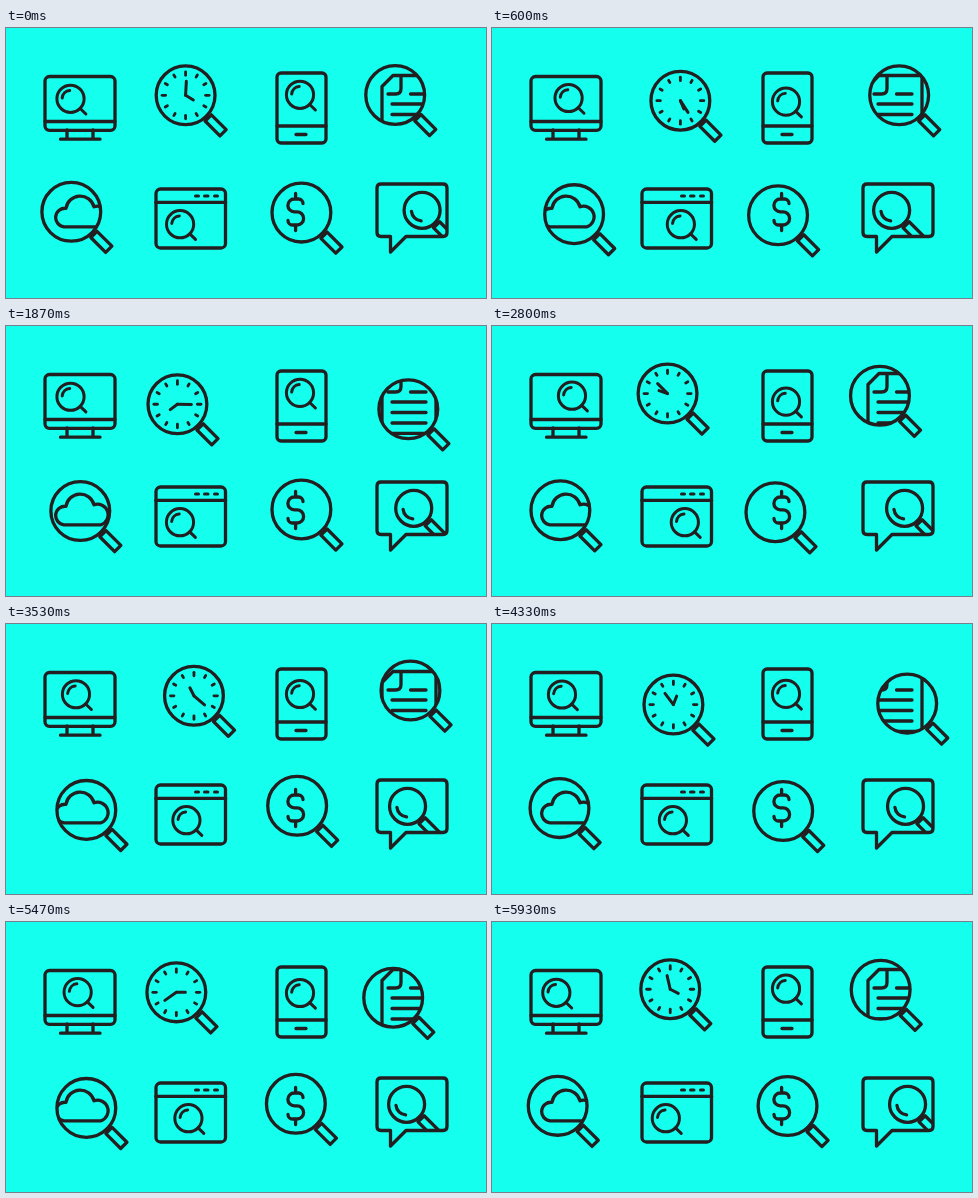
An HTML page for the animation above (5990 ms loop, 480 px wide and 270 px high).

```html
<!DOCTYPE html>
<html lang="en">
<head>
<meta charset="utf-8">
<title>Search icons</title>
<style>
  html, body { margin: 0; width: 100%; height: 100%; overflow: hidden; background: #14ffee; }
  svg { display: block; width: 480px; height: 270px; }
  .ink { fill: none; stroke: #231f20; stroke-width: 3.3; stroke-linecap: round; stroke-linejoin: round; }
  .thin { stroke-width: 3; }
</style>
</head>
<body>
<svg viewBox="0 0 480 270">
  <defs>
    <g id="big">
      <circle r="29.4"/>
      <path transform="rotate(45)" d="M29.4 0H32M32-4.4H53V4.4H32Z"/>
    </g>
    <g id="small">
      <circle r="13.6"/>
      <path d="M9.7 9.7L15.4 15.2M-8.3-.8A8.3 8.3 0 0 1-.8-8.3"/>
    </g>
    <clipPath id="cloudClip"><circle data-move="cloud" r="29.4"/></clipPath>
    <clipPath id="pageClip"><circle data-move="page" r="29.4"/></clipPath>
    <clipPath id="chatClip"><rect x="371" y="156" width="70" height="52.5" rx="4"/></clipPath>
  </defs>

  <rect width="480" height="270" fill="#14ffee"/>

  <g class="ink">
    <!-- monitor -->
    <rect x="39" y="48.5" width="70" height="53.8" rx="4.5"/>
    <path d="M39 93.5H109M61 102V110.5M87 102V110.5M54.5 111.2H94"/>
    <use class="thin" href="#small" data-move="monitor"/>

    <!-- clock -->
    <g data-move="clock">
      <use href="#big"/>
      <g id="ticks" stroke-width="2.8"></g>
      <path id="minute" class="thin" d="M0 0V-14"/>
      <path id="hour" class="thin" d="M0 0V-9"/>
    </g>

    <!-- phone -->
    <rect x="271" y="45" width="49" height="70" rx="4"/>
    <path d="M271 98H320M290 106.5H300"/>
    <use class="thin" href="#small" data-move="phone"/>

    <!-- page -->
    <g clip-path="url(#pageClip)">
      <path d="M387 47.5H430V107.3H376V58.5Z"/>
      <path d="M395 48V60.5Q395 66 389.5 66H382M404.5 66H420M386 76H420M386 86.5H420M386 97H420"/>
    </g>
    <use href="#big" data-move="page"/>

    <!-- cloud -->
    <path clip-path="url(#cloudClip)" d="M58 198.8a9.3 9.3 0 0 1 2-18.5a14.3 14.3 0 0 1 28-1.5a10.3 10.3 0 0 1 7 20z"/>
    <use href="#big" data-move="cloud"/>

    <!-- browser -->
    <rect x="150" y="161" width="69.5" height="59" rx="4.5"/>
    <path d="M150 174.3H219.5"/>
    <path class="thin" d="M189.5 168H192.5M198.5 168H202M208.5 168H211.5"/>
    <use class="thin" href="#small" data-move="browser"/>

    <!-- dollar -->
    <path d="M297 175.5A4.5 4.5 0 0 0 292.5 171H288.3A6.4 6.4 0 0 0 288.3 183.8H291A6.6 6.6 0 0 1 291 197H286.5A4.6 4.6 0 0 1 282 192.4M289.6 165.5V171M289.6 197V202.5"/>
    <use href="#big" data-move="dollar"/>

    <!-- chat -->
    <path d="M375 156H437Q441 156 441 160V204.5Q441 208.5 437 208.5H400L384.5 224V208.5H375Q371 208.5 371 204.5V160Q371 156 375 156Z"/>
    <g clip-path="url(#chatClip)">
      <g data-move="chat">
        <circle r="18"/>
        <path d="M-10.6 1A10.6 10.6 0 0 0-1 10.6"/>
        <path transform="rotate(45)" d="M18 0H20.5M60-4.3H20.5V4.3H60"/>
      </g>
    </g>
  </g>
</svg>
<script>
  const LOOP = 5990, STEPS = 90, TURN = 2 * Math.PI;
  const { cos, sin } = Math;

  // Each path takes an angle; turns is the number of rounds per loop.
  const moves = {
    monitor: { turns: 3, at: a => [72.5 - 8 * cos(a) + 1.7 * sin(a), 70.2 + 0.6 * cos(a)] },
    phone:   { turns: 3, at: a => [294, 71.4 - 4.6 * cos(a) + 0.9 * sin(a)] },
    browser: { turns: 3, at: a => [183.7 - 9.6 * cos(a) + 2.3 * sin(a), 196.2] },
    dollar:  { turns: 3, at: a => [289.2 + 6.2 * cos(a) - 1.3 * sin(a), 184.6 + 2.8 * sin(a)] },
    clock:   { turns: 2, at: a => [178.8 + 0.8 * cos(a) + 9.8 * sin(a), 74 - 6.7 * cos(a) + 0.8 * sin(a)] },
    page:    { turns: 2, at: a => [
      401 - 11.8 * cos(a) + 10.2 * sin(a) - sin(2 * a) - 1.2 * sin(3 * a),
      74.4 - 7.4 * cos(a) - 5.1 * sin(a)] },
    cloud:   { turns: 4, at: a => [74.6 - 9.3 * cos(a), 185.1 - 1.3 * cos(a)] },
    chat:    { turns: 4, at: a => [406.8 + 9.3 * cos(a) + 0.6 * sin(a), 182.3] }
  };

  const byId = id => document.getElementById(id);
  const parts = [...document.querySelectorAll('[data-move]')]
    .map(el => ({ el, move: moves[el.dataset.move] }));

  for (let i = 0; i < 12; i++) {
    const tick = document.createElementNS('http://www.w3.org/2000/svg', 'path');
    tick.setAttribute('d', i % 3 ? 'M0-21V-23.5' : 'M0-20V-23.5');
    tick.setAttribute('transform', `rotate(${i * 30})`);
    byId('ticks').append(tick);
  }

  const turn = (id, deg) => byId(id).setAttribute('transform', `rotate(${deg})`);

  // Fifteen poses a second, with starts rounded to 10 ms.
  const poseAt = ms => Math.floor((Math.floor(ms / 10) + 0.5) * 0.15);

  function draw() {
    const p = poseAt(performance.now() % LOOP) / STEPS;
    for (const { el, move } of parts) {
      const [x, y] = move.at(p * move.turns * TURN);
      el.setAttribute('transform', `translate(${x.toFixed(2)} ${y.toFixed(2)})`);
    }
    turn('minute', 3 + p * 4 * 360);
    turn('hour', 121 + p * 360);
    requestAnimationFrame(draw);
  }
  draw();
</script>
</body>
</html>
```
